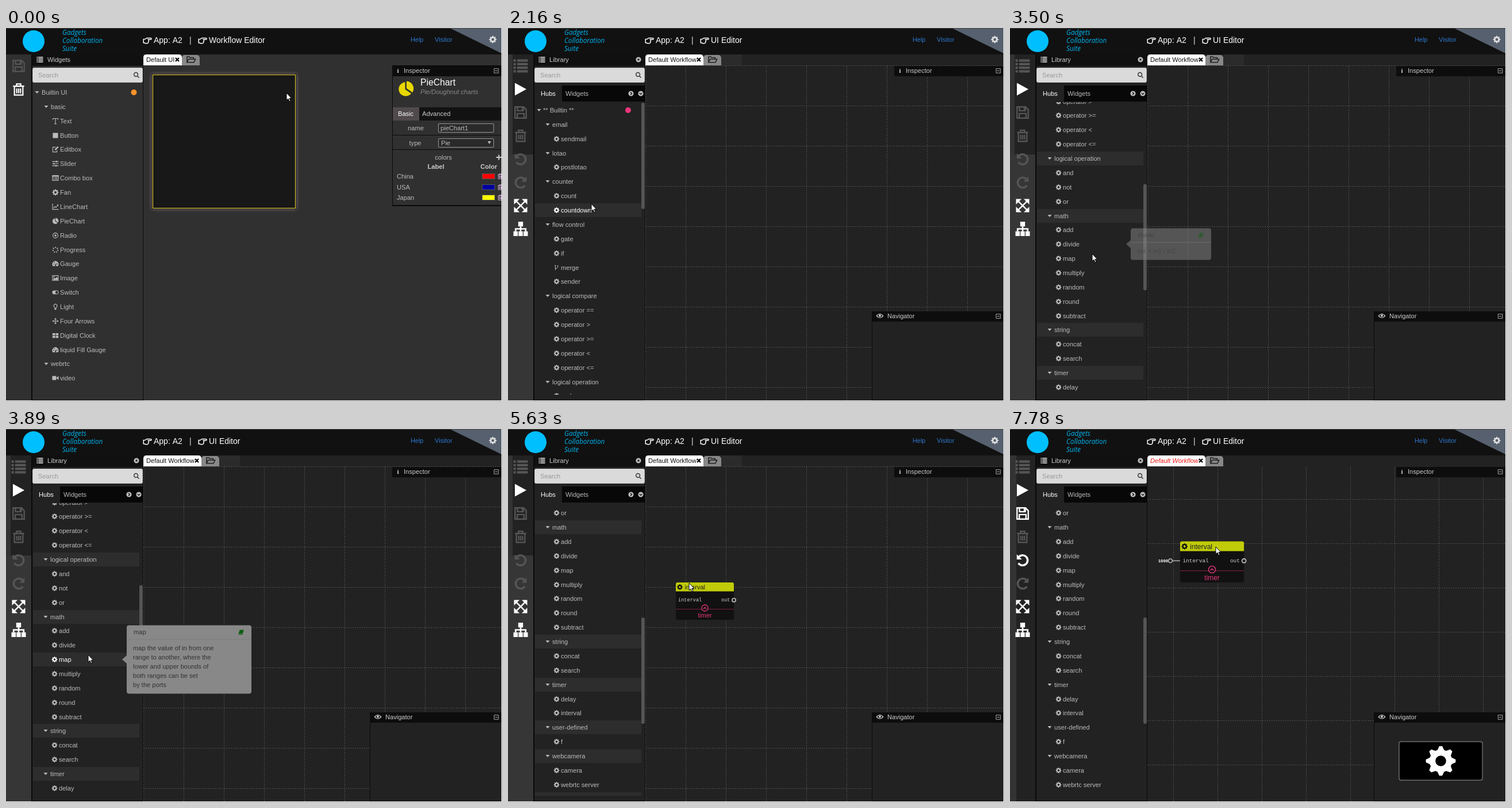
An HTML page with a canvas that plays this animation: 863 px wide and 649 px high, repeating every 8 s.

```html
<!DOCTYPE html>
<html lang="en">
<head>
<meta charset="utf-8">
<title>Workflow editor</title>
<style>
html, body { margin: 0; width: 100%; height: 100%; overflow: hidden; background: #222; }
canvas { display: block; }
</style>
</head>
<body>
<canvas id="stage" width="863" height="649"></canvas>
<script>
const c = document.getElementById('stage').getContext('2d');
const LOOP = 8000, ROW = 24.87, WHEEL = 77.7;
const SANS = '"Liberation Sans", Arial, sans-serif';
const MONO = '"Liberation Mono", monospace';
const OPEN = '"Open Sans", sans-serif';

// Icons live in a 12 x 12 box: [filled path, stroked path]
const ICONS = {
  list: ['M0 .5h2v2h-2zM3 .5h9v2h-9zM0 3.5h2v2h-2zM3 3.5h9v2h-9zM0 6.5h2v2h-2zM3 6.5h9v2h-9zM0 9.5h2v2h-2zM3 9.5h9v2h-9z', ''],
  play: ['M.5 0L11.5 6L.5 12z', ''],
  save: ['M7 1h1v3h-1z', 'M.7 .7h8l2.6 2.6v8h-10.6zM3 .7v3.6h5.5v-3.6M2.8 11.3v-4.3h6.4v4.3'],
  trash: ['', 'M2 3h8v8.3h-8zM.7 2.8h10.6M4 2.5v-1.7h4v1.7M4.2 5v4.5M6 5v4.5M7.8 5v4.5'],
  undo: ['M.4 .6v4.9h4.9z', 'M2.2 3.2A4.8 4.8 0 1 1 2 9'],
  expand: ['M0 0h5l-5 5zM12 0v5l-5-5zM0 12v-5l5 5zM12 12h-5l5-5z', 'M2 2L10 10M10 2L2 10'],
  sitemap: ['M4 0h4v4h-4zM0 8h3.6v4h-3.6zM4.2 8h3.6v4h-3.6zM8.4 8h3.6v4h-3.6z', 'M6 4v4M1.8 8v-2h8.4v2'],
  text: ['', 'M1.2 3.5v-2.4h9.6v2.4M6 1v10M4 11h4'],
  button: ['M2 1h8q1 0 1 1v8q0 1-1 1h-8q-1 0-1-1v-8q0-1 1-1z', ''],
  edit: ['M4.5 8.3l.8-3 5-5 1.8 2-5 5z', 'M9 7.5v3.5h-8v-9h5.5'],
  slider: ['M7 .5h2v3h-2zM2 4.5h2v3h-2zM6 8.5h2v3h-2z', 'M0 2h12M0 6h12M0 10h12'],
  combo: ['M0 1h12v2.5h-12zM1.8 5h1.5v1.2h-1.5zM1.8 7.5h1.5v1.2h-1.5z', 'M.5 1.5h11v9h-11zM4.5 5.6h5.5M4.5 8.1h5.5'],
  line: ['M8.5 2h3.2v3.2z', 'M.6 0v11h11.4M2 8.5l3-3 2 2 3.7-4.5'],
  pie: ['M5.3 .8A5.4 5.4 0 1 0 10 9.5L5.3 6.3zM6.4 0V5.6L11 8.8A5.8 5.8 0 0 0 6.4 0z', ''],
  radio: ['M4 6a2 2 0 1 0 4 0a2 2 0 1 0-4 0z', 'M1.2 6a4.8 4.8 0 1 0 9.6 0a4.8 4.8 0 1 0-9.6 0z'],
  gauge: ['M1 10.5A6 6 0 1 1 11 10.5zM5.2 8.5a1.2 1.2 0 1 0 2 .2l1-5zM2 6h1.5v1.5h-1.5zM3.5 3h1.5v1.5h-1.5zM9 6h1.5v1.5h-1.5z', ''],
  image: ['M2 9.5v-2l2-2 1.5 1.5 3-3 2 2v3.5zM2.2 3h2v2h-2z', 'M.5 1.5h11v9h-11z'],
  toggle: ['M3.5 2.5a3.5 3.5 0 0 0 0 7h4a4 4 0 0 1 0-7z', 'M8.3 2.8a3.2 3.2 0 1 0 .1 0z'],
  bulb: ['M4.5 9.3h3v2.5h-3z', 'M4.7 8.5q0-1.2-1-2.2a3.1 3.1 0 1 1 4.6 0q-1 1-1 2.2z'],
  arrows: ['M6 0l2.3 2.8h-4.6zM6 12l2.3-2.8h-4.6zM0 6l2.8-2.3v4.6zM12 6l-2.8-2.3v4.6z', 'M6 1v10M1 6h10'],
  clock: ['M.3 1.5h5.2v4h-5.2zM6.5 1.5h5.2v4h-5.2zM.3 6.5h5.2v4h-5.2zM6.5 6.5h5.2v4h-5.2z', ''],
  video: ['M0 2.2h7.5v7.6h-7.5zM8 5.5l4-3.3v7.6l-4-3.3z', ''],
  branch: ['', 'M3.5 1v10M3.5 8q5 0 5-5M2.2 1.5h2.6M7.2 2h2.6'],
  hand: ['', 'M.6 4h2l2.4-1.6h5.4q1.3 .1 1.3 1t-1.3 1h-3q1 .8 .2 1.9q.6 .9-.4 1.8q.2 1.6-1.4 1.6h-2.4l-1.6-.7h-1.2z'],
  folder: ['', 'M.7 9.6v-7.4h3l1 1.2h4.6v2M.7 9.6l2-4.2h9l-2 4.2z'],
  search: ['', 'M1.3 4.8a3.7 3.7 0 1 0 7.4 0a3.7 3.7 0 1 0-7.4 0M7.8 7.8l3.2 3.2'],
  minus: ['', 'M1 1h10v10h-10zM3.2 6h5.6'],
  eye: ['M4 5.5a2 2 0 1 0 4 0a2 2 0 1 0-4 0z', 'M.3 6q5.7-7 11.4 0q-5.7 6-11.4 0z'],
  close: ['M1 6a5 5 0 1 0 10 0a5 5 0 1 0-10 0zM4 5l1-1 1 1 1-1 1 1-1 1 1 1-1 1-1-1-1 1-1-1 1-1z', ''],
  right: ['M1 6a5 5 0 1 0 10 0a5 5 0 1 0-10 0zM4.5 4l1-1 3 3-3 3-1-1 2-2z', ''],
  down: ['M1 6a5 5 0 1 0 10 0a5 5 0 1 0-10 0zM4 4.5l-1 1 3 3 3-3-1-1-2 2z', ''],
  book: ['M3.5 1.5h8l-2.5 7.5h-8zM1 9.8h8l.4 1.2h-8z', '']
};

const WIDGETS = [['text', 'Text'], ['button', 'Button'], ['edit', 'Editbox'], ['slider', 'Slider'],
  ['combo', 'Combo box'], ['gear', 'Fan'], ['line', 'LineChart'], ['pie', 'PieChart'], ['radio', 'Radio'],
  ['progress', 'Progress'], ['gauge', 'Gauge'], ['image', 'Image'], ['toggle', 'Switch'], ['bulb', 'Light'],
  ['arrows', 'Four Arrows'], ['clock', 'Digital Clock'], ['gauge', 'liquid Fill Gauge']];

// A trailing colon marks a group
const LIBRARY = ('** Builtin **:|email:|sendmail|lotao:|postlotao|counter:|count|countdown|flow control:|gate|if|merge|sender|' +
  'logical compare:|operator ==|operator >|operator >=|operator <|operator <=|logical operation:|and|not|or|' +
  'math:|add|divide|map|multiply|random|round|subtract|string:|concat|search|timer:|delay|interval|' +
  'user-defined:|f|webcamera:|camera|webrtc server').split('|');

// Step tracks: [start, ...values]
const CURSOR = [[0, 488, 113], [120, 470, 100], [250, 438, 72], [370, 412, 45], [500, 398, 32], [1480, 395, 30],
  [1620, 318, 120], [1750, 234, 216], [1890, 212, 228], [2020, 189, 238], [2160, 145, 306], [2310, 145, 326],
  [3500, 143, 393], [4550, 103, 486], [5360, 205, 400], [5480, 315, 291], [5630, 315, 268], [5760, 314, 240],
  [5890, 313, 212], [6010, 313, 197], [7650, 336, 201], [7780, 358, 205]];
const SCROLL = [[0, 0], [2680, 1], [2830, 2], [2950, 3], [3100, 4], [3220, 5], [4130, 6], [4280, 7]];
const HOVER = [[0, -1], [2160, 7], [2680, 10], [2830, -1], [3620, 26], [4130, -1], [4400, 32], [4550, 35], [4670, 36], [5360, -1]];
const ZOOM = [[0, 1], [6530, .95], [6770, 1], [6890, 1.05], [7010, 1.1]];
const TIP = [[0, 0, 0], [2310, 7, .5], [2430, 7, 1], [2680, 10, .5], [2830, 0, 0], [3500, 25, .5], [3620, 25, .2],
  [3740, 0, 0], [3890, 26, 1], [4130, 0, 0], [4400, 32, 1], [4550, 0, 0], [4670, 36, .5], [4800, 36, 1], [5360, 0, 0]];
const TIP_TEXT = {
  7: [427, 'count down from the initial', 'value, send the current value', 'in \'out\' port, and send true', 'when it reaches zero'],
  10: [427, 'if the in is true, send true in \'then\' port,', 'else send true in \'else\' port'],
  25: [350, 'out = in1 / in2'],
  26: [427, 'map the value of in from one', 'range to another, where the', 'lower and upper bounds of', 'both ranges can be set', 'by the ports'],
  32: [350, 'out = in1 + in2'],
  36: [355, 'send out periodically']
};
const at = (t, track) => track.filter(k => k[0] <= t).pop().slice(1);

function rect(x, y, w, h, color) { c.fillStyle = color; c.fillRect(x, y, w, h); }
function frame(x, y, w, h, color) { c.strokeStyle = color; c.lineWidth = 1; c.strokeRect(x + .5, y + .5, w - 1, h - 1); }
function round(x, y, w, h, r, color) { c.fillStyle = color; c.beginPath(); c.roundRect(x, y, w, h, r); c.fill(); }
function dot(x, y, r, color) { c.fillStyle = color; c.beginPath(); c.arc(x, y, r, 0, 7); c.fill(); }
function ring(x, y, r, color, width = 1.3) {
  c.strokeStyle = color; c.lineWidth = width; c.beginPath(); c.arc(x, y, r, 0, 7); c.stroke();
}
function poly(color, ...p) {
  c.fillStyle = color; c.beginPath();
  for (let i = 0; i < p.length; i += 2) c.lineTo(p[i], p[i + 1]);
  c.fill();
}
// Text is centred on y, with its baseline on a whole pixel
function label(s, x, y, color = '#bbb', size = 11.1, style = '', align = 'left', family = SANS) {
  c.font = `${style} ${size}px ${family}`;
  c.fillStyle = color; c.textAlign = align;
  c.fillText(s, x, Math.round(y + size * .36));
}
function gear(x, y, r, color) {
  c.fillStyle = color; c.beginPath();
  for (let i = 0; i < 32; i++) {
    const a = (i - 1.5) * Math.PI / 16, d = i % 4 === 1 || i % 4 === 2 ? r : r * .76;
    c.lineTo(x + d * Math.cos(a), y + d * Math.sin(a));
  }
  c.closePath(); c.moveTo(x + r * .36, y); c.arc(x, y, r * .36, 0, 7); c.fill('evenodd');
}
function icon(name, x, y, size, color, flip = 1, width = 1.2) {
  if (name === 'gear') return gear(x, y, size / 2, color);
  if (name === 'progress') {
    c.setLineDash([1.8, 1.9]); ring(x, y, 4.2, color, 2); c.setLineDash([]);
    return;
  }
  c.save();
  c.translate(x, y); c.scale(flip * size / 12, size / 12); c.translate(-6, -6);
  c.fillStyle = c.strokeStyle = color; c.lineWidth = width;
  c.fill(new Path2D(ICONS[name][0]), 'evenodd');
  c.stroke(new Path2D(ICONS[name][1]));
  c.restore();
}
const caret = (x, y) => poly('#bbb', x - 3.5, y - 2, x + 3.5, y - 2, x, y + 2);

function header(link) {
  rect(0, 0, 863, 46, '#111');
  rect(0, 0, 863, 1, '#444');
  dot(48, 23, 19, '#00bfff');
  ['Gadgets', 'Collaboration', 'Suite'].forEach((s, i) => label(s, 98, 8 + i * 14, '#00b4f0', 11.7, 'italic', 'left', OPEN));
  icon('hand', 246, 22, 15, '#fff');
  label('App: A2', 257, 21, '#fff', 14);
  label('|', 319, 21, '#ddd', 14);
  icon('hand', 342, 22, 15, '#fff');
  label(link, 353, 21, '#fff', 14);
  label('Help', 704, 20, '#2f78d0', 10.9);
  label('Visitor', 746, 20, '#2f78d0', 11.1);
  poly('#56606e', 774, 1, 862, 1, 862, 44);
  gear(847, 20, 6.5, '#ddd');
}
function panel(title, bg) {
  rect(44, 46, 195, 602, '#0a0a0a');
  rect(46, 66, 192, 581, bg);
  rect(46, 46, 192, 20, '#101010');
  icon('list', 59, 55, 11, '#ccc');
  label(title, 72, 55, '#ccc');
  round(46, 69, 192, 26, 3, '#c4c4c4');
  round(47, 70, 190, 24, 2, '#dadada');
  label('Search', 56, 82, '#999');
  icon('search', 227, 82, 11, '#333', 1, 1.6);
}
function tab(title, w, changed) {
  round(239 + w, 47, 31, 18, [5, 5, 0, 0], '#888');
  icon('folder', 255 + w, 55, 16, '#222');
  round(239, 46, w, 19, [5, 5, 0, 0], '#fff');
  label(title, 244, 55, changed ? '#f01818' : '#111', 11.1, changed ? 'italic' : '');
  c.strokeStyle = '#000'; c.lineWidth = 2.2; c.beginPath();
  const x = 231 + w;
  c.moveTo(x - 3, 52); c.lineTo(x + 3, 58); c.moveTo(x + 3, 52); c.lineTo(x - 3, 58); c.stroke();
}
function dockTitle(title, x, y) {
  rect(x, y, 862 - x, 18, '#0d0d0d');
  if (title === 'Inspector') label('i', 682, y + 8, '#ddd', 11, 'bold', 'center', '"Liberation Serif", serif');
  else icon('eye', 647, y + 8, 12, '#ccc');
  label(title, x + (title === 'Inspector' ? 20 : 27), y + 8, '#ccc');
  icon('minus', 853, y + 8.5, 9, '#bbb');
}

function uiPage() {
  rect(0, 46, 863, 603, '#303030');
  icon('save', 22, 66, 22, '#555');
  icon('trash', 22, 107, 22, '#fff');
  panel('Widgets', '#303030');
  caret(54, 112); label('Builtin UI', 62, 112);
  dot(222.5, 112, 5, '#ff9226');
  caret(70, 137); label('basic', 78, 137);
  WIDGETS.forEach(([name, title], i) => {
    const y = Math.round(161.7 + i * ROW);
    icon(name, 86, y, 11, '#bbb'); label(title, 94, y);
  });
  caret(70, 584.5); label('webrtc', 78, 584.5);
  icon('video', 86, 609, 11, '#bbb'); label('video', 94, 609);
  tab('Default UI', 67);
  c.save(); c.shadowColor = '#86707a'; c.shadowBlur = 6;
  rect(254, 80, 251, 235, '#181818'); c.restore();
  rect(255, 81, 249, 233, '#181818'); frame(255, 81, 249, 233, '#f0dc30');
  inspector();
}
function inspector() {
  rect(672, 65, 191, 245, '#0a0a0a');
  rect(673, 83, 190, 225, '#303030');
  dockTitle('Inspector', 672, 66);
  icon('pie', 696, 106, 27, '#e8d800');
  label('PieChart', 721, 94, '#fff', 15.7);
  label('Pie/Doughnut charts', 721, 111, '#888', 11.1, 'italic');
  rect(673, 138, 190, 23, '#121212'); rect(673, 138, 46, 23, '#504a4c');
  label('Basic', 682, 149, '#fff'); label('Advanced', 724, 149, '#ccc');
  rect(673, 186, 190, 1, '#0a0a0a'); rect(673, 211, 190, 1, '#0a0a0a');
  label('name', 713, 174, '#bbb', 11.1, '', 'center');
  label('type', 712, 200, '#bbb', 11.1, '', 'center');
  for (const y of [166, 192]) { round(752, y, 97, 16, 2, '#999'); round(753, y + 1, 95, 14, 1, '#2a2a2a'); }
  label('pieChart1', 756, 174); label('Pie', 757, 200);
  poly('#bbb', 838, 197, 844, 197, 841, 202);
  label('colors', 761, 225, '#bbb', 11.1, '', 'center');
  rect(853, 224, 9, 2, '#ccc'); rect(856.5, 220.5, 2, 9, '#ccc');
  label('Label', 748, 241, '#ccc', 11.1, 'bold', 'center');
  label('Color', 840, 241, '#ccc', 11.1, 'bold', 'center');
  [['China', '#f00'], ['USA', '#0000a0'], ['Japan', '#ff0']].forEach(([s, color], i) => {
    const y = Math.round(258 + i * 18.7);
    label(s, 680, y);
    rect(828, y - 5, 23, 10, '#555'); rect(829, y - 4, 21, 8, color);
    icon('trash', 860, y, 10, '#c8a8d0');
  });
}

function grid(zoom) {
  const pitch = 70 * zoom;
  c.strokeStyle = '#505050'; c.lineWidth = 1; c.setLineDash([2, 2]); c.beginPath();
  for (let x = 239 - 320 * (zoom - 1); x < 862; x += pitch)
    if (x >= 239) { c.moveTo(Math.round(x) + .5, 66); c.lineTo(Math.round(x) + .5, 648); }
  for (let y = 65 - 200 * (zoom - 1); y < 648; y += pitch)
    if (y >= 65) { c.moveTo(239, Math.round(y) + .5); c.lineTo(862, Math.round(y) + .5); }
  c.stroke(); c.setLineDash([]);
}
function node(x, y, scale, placed) {
  c.save(); c.translate(x, y); c.scale(scale, scale);
  round(0, 0, 101, 65, 3, '#111');
  round(0, 0, 101, 15.5, [3, 3, 0, 0], '#c0cc08');
  gear(7, 8, 5, '#111');
  label('interval', 15.5, 8, '#222', 11);
  label('interval', 4, 30, '#ccc', 8.6, '', 'left', MONO);
  label('out', 94.5, 30, '#ccc', 8.6, '', 'right', MONO);
  if (placed) {
    rect(-12, 30, 12, 1.5, '#aaa');
    ring(-15.5, 30.7, 3, '#bbb');
    label('1000', -19, 30.5, '#fff', 6.6, 'bold', 'right', MONO);
  }
  dot(101, 30.7, 3.6, '#222'); ring(101, 30.7, 3.2, '#bbb', 1.6);
  rect(0, 46, 101, 1, '#7c2048');
  dot(50.5, 44.5, 5.5, '#111'); ring(50.5, 44.5, 5.5, '#e8367c');
  c.beginPath(); c.moveTo(48, 46); c.lineTo(50.5, 43.5); c.lineTo(53, 46); c.stroke();
  label('timer', 50.5, 57, '#e8367c', 10.8, '', 'center');
  c.restore();
}
function tree(t, scroll) {
  const hover = at(t, HOVER)[0], shaded = t >= 2680 && t < 6280;
  c.save(); c.beginPath(); c.rect(46, 129, 192, 509); c.clip();
  LIBRARY.concat(':').forEach((entry, i) => {
    const y = Math.round(143 + i * ROW - scroll), group = entry.endsWith(':'), name = entry.replace(':', '');
    if (y < 110 || y > 660) return;
    if (shaded && group || i === hover) rect(47, y - 12, 185, 24, '#2d2d2d');
    if (!name) return;
    const color = i === hover ? '#fff' : '#bbb';
    if (group) caret(i ? 69 : 54, y);
    else icon(name === 'merge' ? 'branch' : 'gear', 84.5, y, 10, color);
    label(name, group ? (i ? 77 : 61) : 92, y, color);
    if (!i) dot(209, y, 5, '#e8367c');
  });
  c.restore();
  round(232, 130 + scroll * .364, 6, 185, 3, '#555');
}
function tooltip(t, scroll) {
  const [row, alpha] = at(t, TIP);
  if (!alpha) return;
  const [right, ...lines] = TIP_TEXT[row], h = 39 + 16 * lines.length;
  const y = Math.round(143 + row * ROW - scroll), top = y - h / 2;
  c.save(); c.globalAlpha = alpha;
  round(210, top, right - 210, h, 4, '#888');
  poly('#888', 202, y, 210, y - 7, 210, y + 7);
  label(LIBRARY[row], 222, top + 12, '#333');
  icon('book', right - 18, top + 12, 11, '#0c6010');
  rect(211, top + 24, right - 212, 1, '#808080');
  lines.forEach((s, i) => label(s, 221, top + 40 + 16 * i, '#333'));
  c.restore();
}
function workflowPage(t) {
  const loaded = t >= 1200, dropped = t >= 6280, stale = t >= 1890 && !dropped;
  const scroll = at(t, SCROLL)[0] * WHEEL, zoom = at(t, ZOOM)[0];
  rect(0, 46, 863, 603, '#222');
  rect(0, 46, dropped ? 11 : 8, 602, '#333');
  if (stale) rect(0, 220, 44, 428, '#363636');
  if (t >= 1620 && !dropped) rect(371, 46, 36, 19, '#2b2b2b');
  const lit = dropped ? '#fff' : '#555';
  [['list', '#555', 25], ['play', '#fff', 22], ['save', lit], ['trash', '#555'], ['undo', lit], ['undo', '#555', 22, -1],
    ['expand', '#fff', 23], ['sitemap', '#fff', 25]].forEach(([name, color, size = 22, flip], i) =>
    icon(name, 22, 66 + i * 40.5, size, color, flip, name === 'undo' ? 1.9 : 1.3));
  panel('Library', '#222');
  icon('close', 227, 55, 11, '#bbb');
  rect(94, 100, 144, 28, '#080808');
  label('Hubs', 57, 114, '#fff'); label('Widgets', 100, 114);
  icon('right', 214, 114, 11, '#bbb'); icon('down', 231, 114, 11, '#bbb');
  tab('Default Workflow', 101, dropped);
  if (loaded) { grid(zoom); tree(t, scroll); }
  if (t >= 5480) {
    const [x, y] = at(t, CURSOR);
    if (t < 6280) node(x - 23, y - 1, 1);
    else node(290 + 60 * (zoom - 1), 196 - 5 * (zoom - 1), zoom, true);
  }
  dockTitle('Inspector', 672, 66);
  rect(633, 493, 229, 155, '#0a0a0a'); rect(634, 511, 228, 136, '#222');
  dockTitle('Navigator', 633, 493);
  if (dropped) {
    round(676.5, 543.5, 146, 68, 4, '#999'); round(677.5, 544.5, 144, 66, 3, '#000');
    gear(749.5, 577.5, 26, '#fff');
  }
  tooltip(t, scroll);
}
function statusBar() {
  round(-1, 629, 287, 20, [0, 4, 0, 0], '#d8d8d8');
  label('10.239.43.1:8080/#/ui_ide/UI_ef14f0c0-060c-11e6-9c...', 1, 639, '#666', 11.1, '', 'left', OPEN);
}
function cursor(t) {
  const [x, y] = at(t, CURSOR), hand = t >= 650 && t < 1480;
  const shape = new Path2D(hand
    ? 'M3.5 9V1.5q1-1.5 2 0V6l5.5 1.2q1.2 .4 1 2L11 13v3.5H5V14L1 9.5q.5-1.8 2.5-.5z'
    : 'M0 0V12.5L3 10L5 14.8L7 14L5 9.3H8.8z');
  c.save(); c.translate(hand ? 393 : x, hand ? 27 : y);
  c.fillStyle = '#fff'; c.strokeStyle = '#000'; c.lineWidth = 1;
  c.fill(shape); c.stroke(shape);
  c.restore();
}
function draw() {
  const t = performance.now() % LOOP, workflow = t >= 1070;
  if (workflow) workflowPage(t); else uiPage();
  header(workflow ? 'UI Editor' : 'Workflow Editor');
  if (t >= 800 && t < 2020) statusBar();
  rect(862, 0, 1, 649, '#fff'); rect(0, 648, 863, 1, '#fff');
  cursor(t);
  requestAnimationFrame(draw);
}
draw();
</script>
</body>
</html>
```
